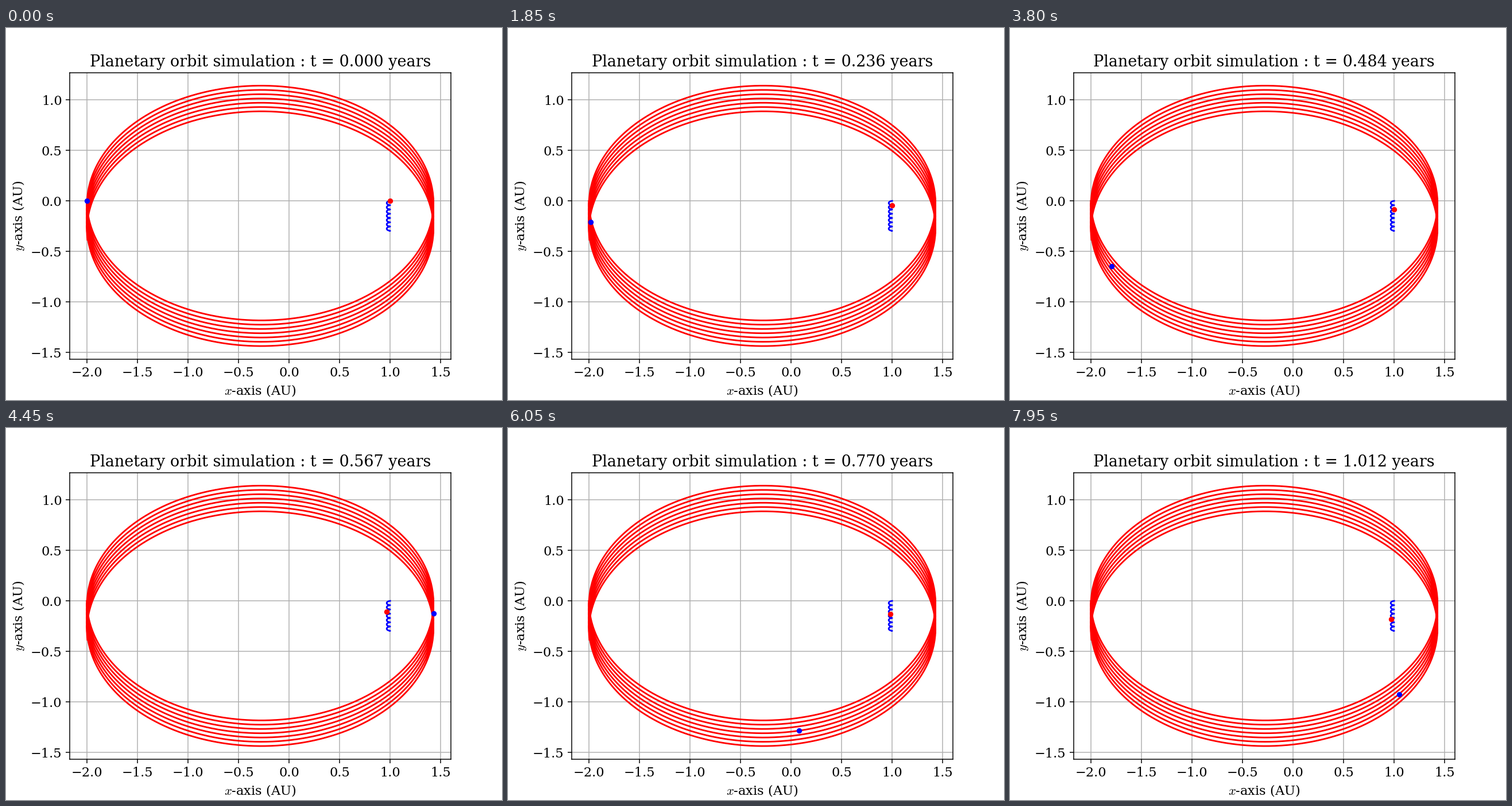
Write a matplotlib script that moves like this. It is 864x648 px and loops after 8000 ms.

```python
import numpy as np
import matplotlib.pyplot as plt
from matplotlib.animation import FuncAnimation

plt.rcParams.update({
    "font.family": "DejaVu Serif",
    "font.size": 12,
    "mathtext.fontset": "cm",
})

# Two bodies with G = 1; one year is 2*pi time units
M_SUN, M_PLANET = 100.0, 1.0
MASS = M_SUN + M_PLANET
SUN_X, PLANET_X, PLANET_VY = 1.0, -2.0, -3.0
T_END = 10.0
DT = 0.04
FRAMES = 160

# Kepler elements of the relative orbit, which starts at its far point
far = SUN_X - PLANET_X
a = 1 / (2 / far - PLANET_VY**2 / MASS)
e = far / a - 1
b = a * np.sqrt(1 - e**2)
rate = np.sqrt(MASS / a**3)
com_x = (M_SUN * SUN_X + M_PLANET * PLANET_X) / MASS
com_vy = M_PLANET * PLANET_VY / MASS


def positions(t):
    """Return (sun x, sun y, planet x, planet y) at time t."""
    mean = np.mod(np.pi + rate * np.asarray(t, float), 2 * np.pi)
    ecc = np.full_like(mean, np.pi)
    for _ in range(30):
        ecc = ecc - (ecc - e * np.sin(ecc) - mean) / (1 - e * np.cos(ecc))
    rx, ry = a * (np.cos(ecc) - e), b * np.sin(ecc)
    com_y = com_vy * np.asarray(t, float)
    ps, pp = M_PLANET / MASS, M_SUN / MASS
    return com_x - ps * rx, com_y - ps * ry, com_x + pp * rx, com_y + pp * ry


fig, ax = plt.subplots(figsize=(6.4, 4.8), dpi=135)
sx, sy, px, py = positions(np.linspace(0, T_END, 4001))
ax.plot(sx, sy, "b-")
ax.plot(px, py, "r-")
sun, = ax.plot(sx[:1], sy[:1], "ro", markersize=4)
planet, = ax.plot(px[:1], py[:1], "bo", markersize=4)
ax.set_aspect("equal")
ax.set_xlabel("$x$-axis (AU)")
ax.set_ylabel("$y$-axis (AU)")
ax.grid(True)
title = ax.set_title("")


def update(i):
    t = i * DT
    x1, y1, x2, y2 = positions(t)
    sun.set_data([x1], [y1])
    planet.set_data([x2], [y2])
    title.set_text(f"Planetary orbit simulation : t = {t / (2 * np.pi):.3f} years")
    return sun, planet, title


anim = FuncAnimation(fig, update, frames=FRAMES, interval=50, repeat=True,
                     repeat_delay=0, init_func=lambda: update(0))
plt.show()
```
